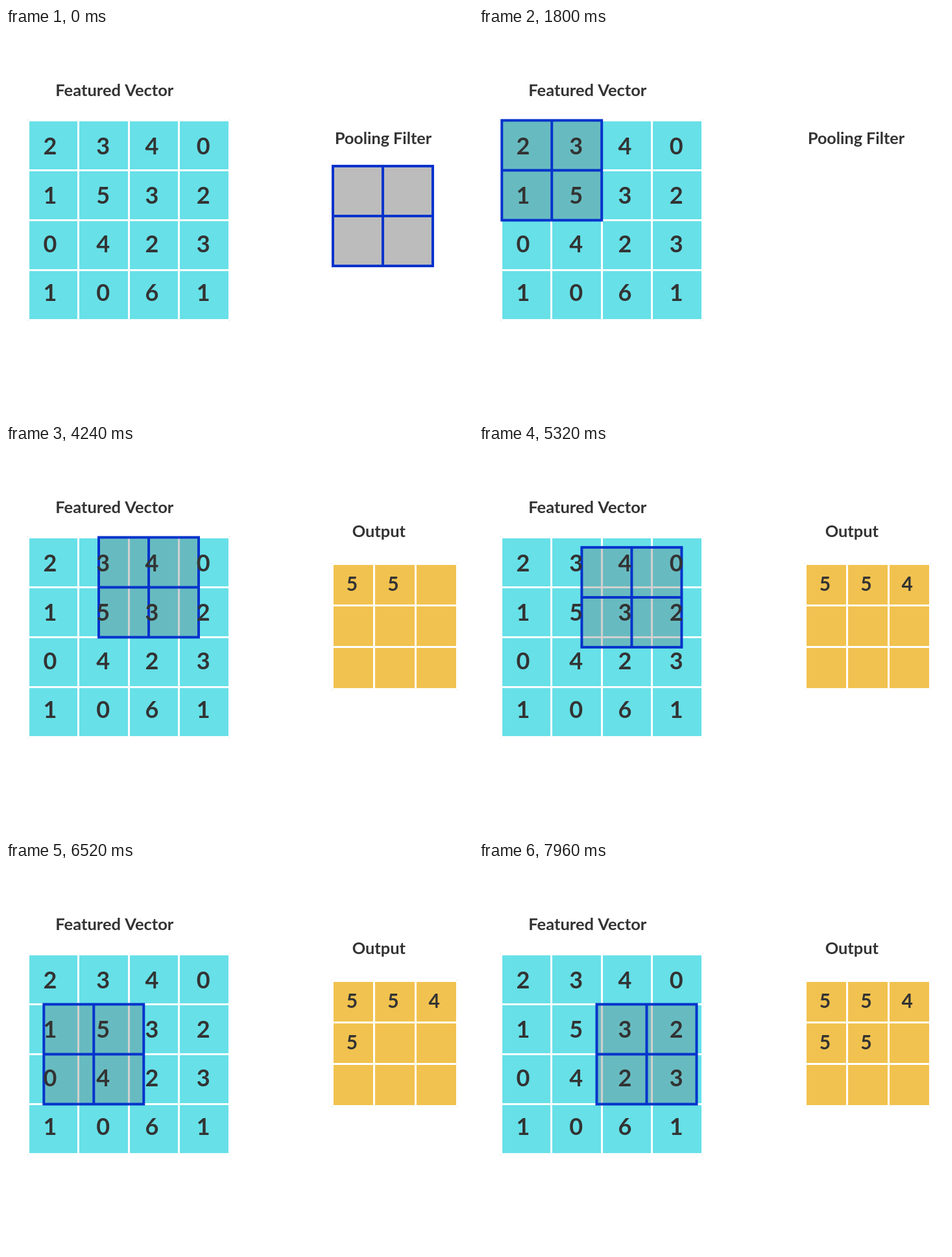
An HTML page with a canvas for the animation above (8 s loop, 720 by 600 pixels).

```html
<!DOCTYPE html>
<html lang="en">
<head>
<meta charset="utf-8">
<title>Max pooling</title>
<style>
  html, body { margin: 0; width: 100%; height: 100%; overflow: hidden; background: #fff; }
  canvas { display: block; }
</style>
</head>
<body>
<canvas id="stage" width="720" height="600"></canvas>
<script>
const ctx = document.getElementById('stage').getContext('2d');
const LOOP = 8000, STEP = 40, SWITCH = 1880, SPAN = 400, ENTRY = 600;

const rows = ['2340', '1532', '0423', '1061'];
const colX = [68, 149.7, 225, 304.2];
const rowY = r => 195.4 + 75.2 * r;
const outX = c => 533.5 + 63.4 * c;
const outY = r => 225 + 64 * r;

// Start times: the filter's slide to each window, then its maximum's flight
const slides = [1200, 2960, 4080, 5240, 6400, 7600];
const flights = [2360, 3480, 4690, 5840, 7040];

const mix = (a, b, p) => a + (b - a) * p;
const progress = (t, start, span) => Math.min(1, Math.max(0, (t - start) / span));
const cellOf = k => [Math.floor(k / 3), k % 3];

// First largest digit in the 2 by 2 window
function findMax(k) {
  const [r0, c0] = cellOf(k);
  let best = { v: '' };
  for (let i = 0; i < 4; i++) {
    const r = r0 + (i >> 1), c = c0 + i % 2;
    if (rows[r][c] > best.v) best = { v: rows[r][c], r, c };
  }
  return best;
}

function label(text, x, y, size) {
  ctx.font = `bold ${size}px Lato, sans-serif`;
  ctx.textAlign = 'center';
  ctx.fillStyle = '#333';
  ctx.fillText(text, x, y);
}

function grid(x, y, w, h, n, color) {
  const gap = 3;
  ctx.fillStyle = color;
  ctx.fillRect(x, y, w, h);
  ctx.fillStyle = '#fff';
  for (let i = 1; i < n; i++) {
    ctx.fillRect(Math.floor(x + i * (w + gap) / n - gap), y, gap, h);
    ctx.fillRect(x, Math.floor(y + i * (h + gap) / n - gap), w, gap);
  }
  ctx.fillStyle = '#ccc';
  for (const cx of [x - 3, x + w + 1])
    for (const cy of [y - 3, y + h + 2]) ctx.fillRect(cx, cy, 1, 1);
}

function filter(t) {
  const side = 154, half = side / 2;
  let x = 504, y = 213;
  slides.forEach((start, k) => {
    const [r, c] = cellOf(k);
    const p = progress(t, start, k ? SPAN : ENTRY);
    x = mix(x, 35.2 + 77 * c, p);
    y = mix(y, 142.5 + 77 * r, p);
  });
  const alpha = mix(0.44, 0.31, progress(t, slides[0], ENTRY));
  ctx.fillStyle = `rgba(103,103,103,${alpha})`;
  ctx.fillRect(x, y, side, side);
  ctx.strokeStyle = '#0433cc';
  ctx.lineWidth = 4;
  ctx.strokeRect(x, y, side, side);
  ctx.beginPath();
  ctx.moveTo(x + half, y);
  ctx.lineTo(x + half, y + side);
  ctx.moveTo(x, y + half);
  ctx.lineTo(x + side, y + half);
  ctx.stroke();
}

function draw(t) {
  ctx.fillStyle = '#fff';
  ctx.fillRect(0, 0, 720, 600);

  label('Featured Vector', 167.3, 105, 25.5);
  grid(36, 144, 307, 305, 4, '#67e0e8');

  if (t < SWITCH) {
    label('Pooling Filter', 581.5, 179, 25.2);
  } else {
    label('Output', 574.8, 142.3, 25.4);
    grid(505, 185, 189, 190, 3, '#f1c24f');
  }

  filter(t);
  rows.forEach((row, r) => [...row].forEach((v, c) => label(v, colX[c], rowY(r), 36)));

  flights.forEach((start, k) => {
    if (t < start) return;
    const { v, r, c } = findMax(k);
    const [or, oc] = cellOf(k);
    const p = progress(t, start, SPAN);
    label(v, mix(colX[c], outX(oc), p), mix(rowY(r), outY(or), p), mix(36, 30, p));
  });
}

function tick() {
  const t = performance.now() % LOOP;
  draw(Math.floor(t / STEP) * STEP);
  requestAnimationFrame(tick);
}
tick();
</script>
</body>
</html>
```
